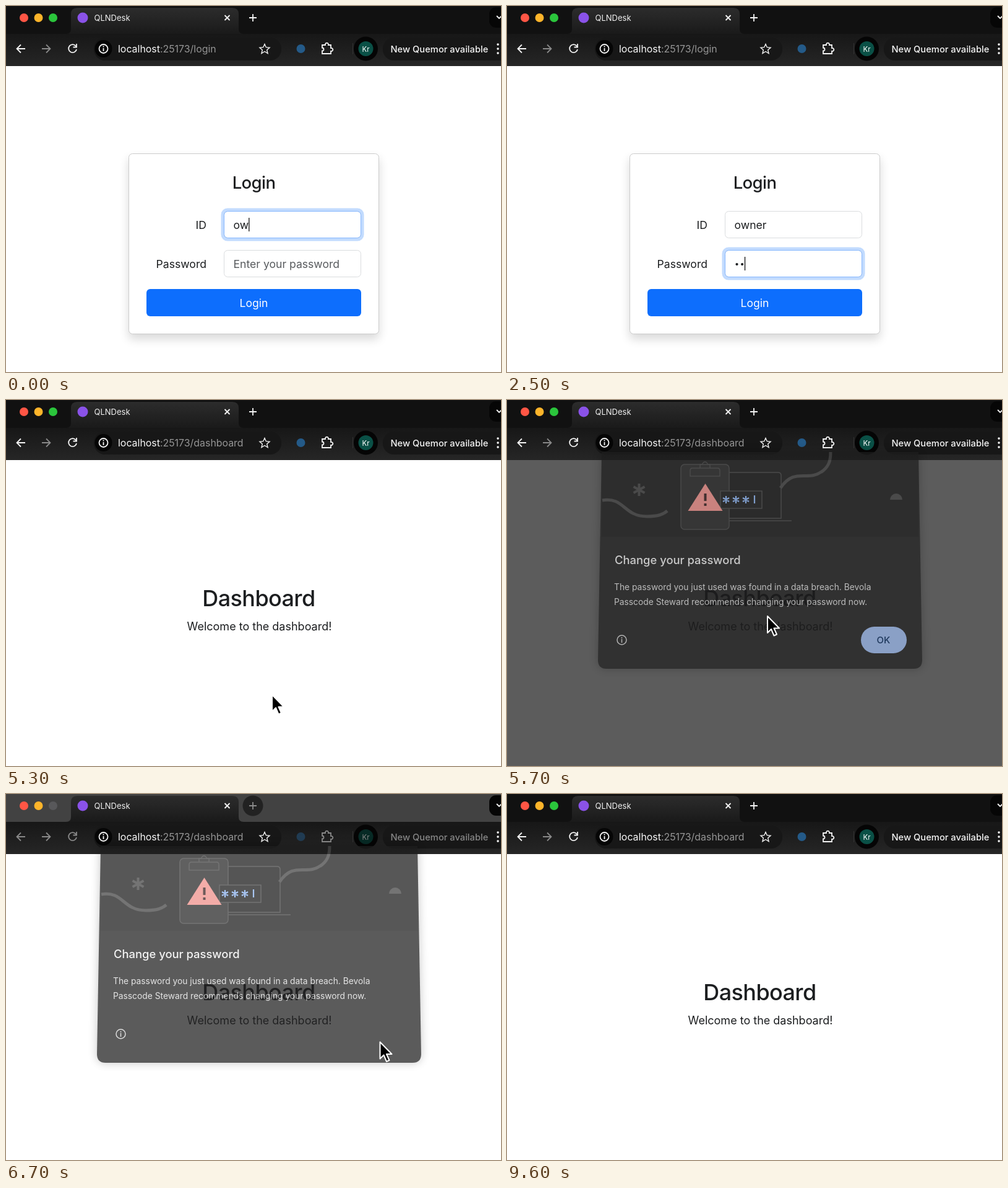
An HTML page that plays this animation: 800 by 591 pixels, repeating every 9700 ms.

```html
<!DOCTYPE html>
<html lang="en">
<head>
<meta charset="utf-8">
<title>Login demo</title>
<style>
  html, body { margin: 0; width: 100%; height: 100%; overflow: hidden; background: #fff; }
  svg { display: block; width: 800px; height: 591px; font: 17.6px Inter, sans-serif; fill: #1c1e20; }
  .line { fill: none; stroke: #f4f4f4; stroke-width: 1.8; }
  .mid { text-anchor: middle; }
  .field { fill: #fff; stroke: #dadcde; }
  .strip { fill: #111; }
  .plusBack { fill: none; }
  .inactive .strip { fill: #424242; }
  .inactive .plusBack { fill: #222; }
  .inactive .zoom { fill: #58585a; }
  .inactive .dims { opacity: .5; }
  #scrim { fill: #000; opacity: .64; }
  #cursor { fill: #000; stroke: #fff; stroke-width: 2; stroke-linejoin: round; }
</style>
</head>
<body>
<svg viewBox="0 0 800 591">
  <defs>
    <linearGradient id="tabFill" x2="0" y2="1"><stop stop-color="#2c2c2c"/><stop offset="1" stop-color="#1a1a1a"/></linearGradient>
    <linearGradient id="barFill" x2="0" y2="1"><stop stop-color="#171717"/><stop offset="1" stop-color="#262626"/></linearGradient>
    <filter id="blur" x="-20%" y="-20%" width="140%" height="140%"><feGaussianBlur stdDeviation="8"/></filter>
  </defs>

  <g id="login">
    <rect x="198" y="246" width="405" height="292" rx="6" opacity=".15" fill="#000" filter="url(#blur)"/>
    <rect x="198.500" y="238.500" width="404" height="291" rx="6" fill="#fff" stroke="#ccc"/>
    <text x="400.500" y="295" class="mid" font-size="27.500" font-weight="500" letter-spacing="-.6">Login</text>
    <text x="324" y="359.500" text-anchor="end">ID</text>
    <text x="324" y="422.500" text-anchor="end">Password</text>
    <rect class="field" x="352.500" y="331.500" width="221" height="43" rx="6"/>
    <rect class="field" x="352.500" y="394.500" width="221" height="43" rx="6"/>
    <g id="ring" fill="none">
      <rect x="350" y="329" width="226" height="48" rx="8" stroke="#c2dbfe" stroke-width="5"/>
      <rect x="352.500" y="331.500" width="221" height="43" rx="6" stroke="#86b7fe"/>
    </g>
    <text id="userId" x="367.500" y="359.500"></text>
    <text id="hint" x="367.500" y="422.500" fill="#585b5e">Enter your password</text>
    <g id="dots"></g>
    <rect id="caret" width="1.300" height="22" fill="#111"/>
    <rect id="button" x="227" y="457" width="347" height="44" rx="6"/>
    <text x="400.500" y="486" class="mid" fill="#fff">Login</text>
  </g>

  <g id="dashboard">
    <text x="408.500" y="333" class="mid" font-size="36" font-weight="500" letter-spacing="-.6">Dashboard</text>
    <text x="409.500" y="372" class="mid" font-size="18">Welcome to the dashboard!</text>
  </g>
  <rect id="scrim" y="97" width="800" height="494"/>

  <g id="browser">
    <rect class="strip" width="800" height="46"/>
    <rect y="45" width="800" height="52" fill="url(#barFill)"/>
    <path d="M97 45q8 0 8-8V13q0-10 10-10h251q10 0 10 10v24q0 8 8 8z" fill="url(#tabFill)"/>
    <circle cx="29" cy="19" r="7" fill="#ff5645"/>
    <circle cx="52.500" cy="19" r="7" fill="#fdb42a"/>
    <circle class="zoom" cx="76" cy="19" r="7" fill="#2bc53c"/>
    <circle cx="124" cy="19" r="8.500" fill="#8a52e8"/>
    <text x="142.500" y="23.500" font-size="13" fill="#f0f0f0">QLNDesk</text>
    <path class="line" d="M353.500 15l8 8m0-8l-8 8" stroke-width="1.600"/>
    <circle class="plusBack" cx="399" cy="19" r="16.500"/>
    <path class="line dims" d="M393 19h12m-6-6v12"/>
    <rect x="781" y="2" width="40" height="33" rx="11" fill="#060606"/>
    <path class="line" d="M793 16l4 4 4-4"/>

    <rect x="142" y="51" width="303" height="37" rx="18" fill="#171717"/>
    <rect x="609" y="51" width="220" height="37" rx="18" fill="#171717"/>
    <g class="dims">
      <path class="line" d="M31 69H18m6-6.500L17.500 69l6.500 6.500"/>
      <path class="line" d="M113 65a6.500 6.500 0 1 0 1 5M114 61v5.500h-5.500"/>
      <circle cx="476.500" cy="69" r="7" fill="#245a88"/>
      <path class="line" d="M511 63h5a2.600 2.600 0 1 1 5 0h4v5a2.600 2.600 0 1 1 0 5v4h-14v-4.500a2.500 2.500 0 0 0 0-5z"/>
    </g>
    <path class="line" d="M58 69h13m-6-6.500l6.500 6.500-6.500 6.500" opacity=".5"/>
    <circle cx="157.500" cy="69" r="14" fill="#050505"/>
    <circle class="line" cx="157.500" cy="69" r="7"/>
    <path class="line" d="M157.500 68v5m0-8.500v2"/>
    <text x="181" y="74.500" font-size="15.900" fill="#959595"><tspan fill="#f8f8f8">localhost</tspan><tspan id="path"></tspan></text>
    <path class="line" style="stroke-width:1.400" d="M418 61.500l2.300 5.200 5.700.5-4.300 3.800 1.300 5.500-5-3-5 3 1.300-5.500-4.300-3.800 5.700-.5z"/>
    <path d="M560.500 60v18" stroke="#343434"/>
    <circle cx="581.500" cy="69" r="19.500" fill="#050505"/>
    <g class="dims">
      <circle cx="581.500" cy="69" r="12" fill="#0a5046"/>
      <text x="581.500" y="73.500" class="mid" font-size="11.500" fill="#fff">Kr</text>
      <text x="621.500" y="74.500" font-size="14.700" font-weight="500" fill="#f4f4f4">New Quemor available</text>
    </g>
    <path d="M795 62v.1m0 6.900v.1m0 6.900v.1" stroke="#f4f4f4" stroke-width="3.600" stroke-linecap="round"/>
  </g>

  <g id="dialog">
    <path id="glow" fill="#000" opacity=".3" filter="url(#blur)"/>
    <path id="panel" fill="#232323"/>
    <path d="M153 84H665V221H153z" fill="#1d1d1d"/>
    <g fill="none" stroke="#444" stroke-width="1.500">
      <path d="M359 117h79q5 0 5 5v69h-84M359 195h101" fill="#1a1a1a"/>
      <rect x="281" y="104" width="78" height="105" rx="6" fill="#2a2a2a"/>
      <path d="M296 123v-9q0-4 4-4h40q4 0 4 4v9zM312 110v-6h4a4 4 0 0 1 8 0h4v6"/>
      <rect x="345" y="147" width="67" height="28" fill="#1d1d1d"/>
      <path stroke-width="5" d="M154 162c36-6 34 26 72 26 18 0 26-3 33-9M442 142c24-35 44-8 69-28 10-8 12-18 12-30"/>
      <path stroke-width="4" d="M213.500 135v20m-9-15l18 10m0-10l-18 10"/>
    </g>
    <path d="M619 161a10 10 0 0 1 20 0z" fill="#444"/>
    <path d="M320.500 135l28 44h-56z" fill="#f0908a"/>
    <path d="M320.500 151v12m0 4v4" stroke="#3a2220" stroke-width="4"/>
    <path id="stars" fill="none" stroke="#8cb4f4" stroke-width="2.200"/>
    <g fill="#dcdcdc">
      <text x="174" y="264.500" font-size="18.400" font-weight="500" fill="#f0f0f0">Change your password</text>
      <text x="173" y="307" font-size="13.800">The password you just used was found in a data breach. Bevola</text>
      <text x="173" y="330.500" font-size="13.800">Passcode Steward recommends changing your password now.</text>
    </g>
    <g fill="none" stroke="#d0d0d0" stroke-width="1.500"><circle cx="185.500" cy="387.500" r="7.500"/><path d="M185.500 386v6m0-9v2"/></g>
    <g id="ok">
      <rect x="572" y="366" width="74" height="43" rx="21.500" fill="#9ab8ec"/>
      <text x="608.500" y="393" class="mid" font-size="15" font-weight="500" fill="#0a2c5c">OK</text>
    </g>
  </g>
  <path id="cursor" d="M0 0V27l6-6 4.500 10.500L15 29.500l-4.500-10H19z"/>
</svg>

<script>
const LOOP = 9700, STEP = 100;
const USER = "owner";
const TYPED_AT = [0, 0, 400, 700, 1000];
const CURSOR = [[4300, 602, 528], [5000, 430, 476], [5300, 430, 476], [5700, 421, 349],
                [6000, 421, 349], [6400, 604.5, 400.5]];
const DIALOG = [[5500, 0], [5700, .74], [5800, 1], [6600, 1], [6700, .74], [6900, 0]];

const el = Object.fromEntries([...document.querySelectorAll("[id]")].map(e => [e.id, e]));
const set = (e, attrs) => Object.entries(attrs).forEach(([k, v]) => e.setAttribute(k, v));
const show = (e, on) => { e.style.display = on ? "" : "none"; };
const smooth = u => u * u * (3 - 2 * u);

// Interpolated values of [time, ...values] keys.
function track(keys, t, ease = u => u) {
  const i = keys.findIndex(k => k[0] > t);
  if (i < 1) return keys.at(i).slice(1);
  const a = keys[i - 1], b = keys[i], u = ease((t - a[0]) / (b[0] - a[0]));
  return a.slice(1).map((v, j) => v + (b[j + 1] - v) * u);
}

for (let i = 0; i < 9; i++) {
  const dot = document.createElementNS("http://www.w3.org/2000/svg", "circle");
  set(dot, { cx: 371.5 + 8.6 * i, cy: 417, r: 2.1 });
  el.dots.append(dot);
}
el.stars.setAttribute("d", [354, 370, 386].map(x =>
  `M${x} 155v12m-5-9l10 6m0-6l-10 6`).join("") + "M400 154v13");

function drawLogin(t) {
  const onPassword = t >= 1800;
  const count = Math.max(0, Math.min(9, Math.floor((t - 2020) / 180)));
  el.userId.textContent = USER.slice(0, TYPED_AT.filter(at => at <= t).length);
  [...el.dots.children].forEach((dot, i) => show(dot, i < count));
  show(el.hint, !count);
  set(el.ring, { transform: `translate(0 ${t >= 1900 ? 63 : 0})` });
  const caretX = onPassword ? 367 + count * 8.45 : 367.5 + el.userId.getComputedTextLength();
  set(el.caret, { x: caretX, y: onPassword ? 405 : 342 });
  set(el.button, { fill: t >= 4800 ? "#0b5ed7" : "#0d6efd" });
}

function drawDialog(t) {
  const [alpha] = track(DIALOG, t);
  const closing = t > 6600;
  const s = 23 * (1 - alpha);
  const shape = `M153 84H665L${665 + s} 420q0 14-14 14H${167 - s}q-14 0-14-14z`;
  show(el.dialog, alpha > 0);
  show(el.ok, !closing);
  show(el.scrim, t >= 5600 && !closing);
  set(el.dialog, { opacity: alpha });
  set(el.panel, { d: shape });
  set(el.glow, { d: shape });
}

function draw(t) {
  const loggedIn = t >= 5300;
  show(el.login, !loggedIn);
  show(el.dashboard, loggedIn);
  el.path.textContent = ":25173/" + (loggedIn ? "dashboard" : "login");
  if (!loggedIn) drawLogin(t);
  drawDialog(t);
  el.browser.classList.toggle("inactive", t >= 6100 && t < 6800);
  show(el.cursor, t >= 4300 && t < 7900);
  set(el.cursor, { transform: `translate(${track(CURSOR, t, smooth)})` });
}

function tick() {
  draw(Math.floor(performance.now() % LOOP / STEP) * STEP);
  requestAnimationFrame(tick);
}
tick();
</script>
</body>
</html>
```
